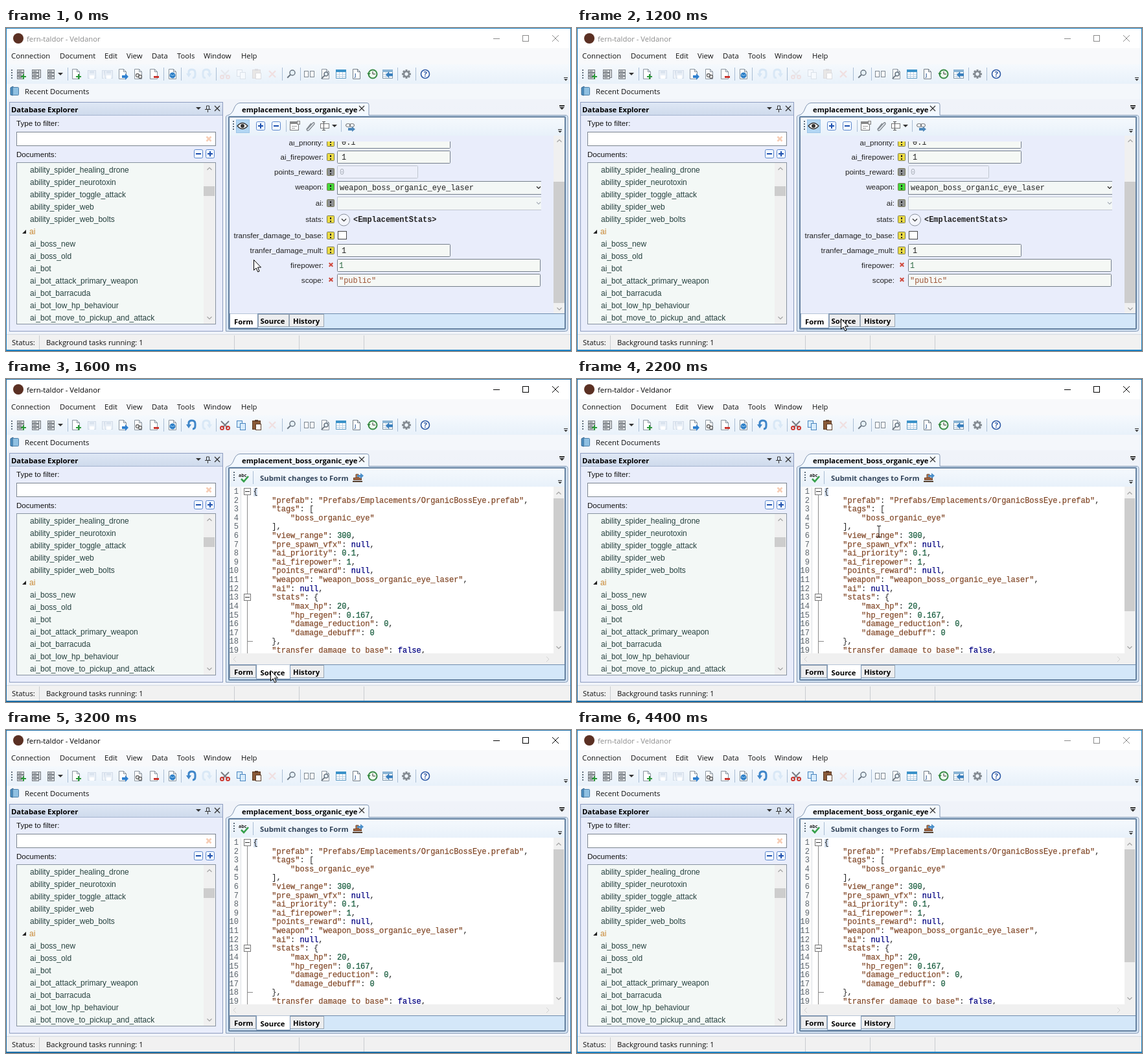
Recreate the animation shown at these times as an HTML page. Size 872 by 498 pixels, loop 4.6 s.

```html
<!DOCTYPE html>
<html lang="en">
<head>
<meta charset="utf-8">
<title>Document editor</title>
<style>
html, body { margin: 0; width: 872px; height: 498px; overflow: hidden; background: #fff; }
svg { display: block; }
text { white-space: pre; }
.ui { font: 11.3px "Open Sans", "Noto Sans", sans-serif; }
.bold { font: bold 11.3px "Open Sans", "Noto Sans", sans-serif; }
.list { font: 12px "Liberation Sans", Arial, sans-serif; }
.label { font: 11.6px "Liberation Sans", Arial, sans-serif; }
.value { font: 11.9px "Liberation Mono", monospace; }
.code { font: 12px "Liberation Mono", monospace; stroke-width: .25px; }
.mini { font: bold 7px "Open Sans", sans-serif; }
.strong { font-weight: bold; }
.hide { display: none; }
</style>
</head>
<body>
<svg id="stage" width="872" height="498" viewBox="0 0 872 498"></svg>
<script>
const R = (x, y, w, h, fill, line, r = 0) => line
  ? `<rect x="${x + .5}" y="${y + .5}" width="${w - 1}" height="${h - 1}" rx="${r}" fill="${fill}" stroke="${line}"/>`
  : `<rect x="${x}" y="${y}" width="${w}" height="${h}" rx="${r}" fill="${fill}"/>`;
const P = (d, line, fill = "none", w = 1) =>
  `<path d="${d}" stroke="${line}" fill="${fill}" stroke-width="${w}"/>`;
const C = (x, y, r, fill, line = "none", w = 1) =>
  `<circle cx="${x}" cy="${y}" r="${r}" fill="${fill}" stroke="${line}" stroke-width="${w}"/>`;
const T = (x, y, s, cls, fill = "#111", more = "") =>
  `<text x="${x}" y="${y}" class="${cls}" fill="${fill}" ${more}>${s}</text>`;
const G = (id, s) => `<g id="${id}">${s}</g>`;
const esc = s => s.replace(/</g, "&lt;").replace(/>/g, "&gt;");
const grad = (id, a, b) => `<linearGradient id="${id}" x2="0" y2="1">
  <stop stop-color="${a}"/><stop offset="1" stop-color="${b}"/></linearGradient>`;

const cross = (x, y, r, c, w) => P(`M${x - r} ${y - r}l${2 * r} ${2 * r}m0 ${-2 * r}l${-2 * r} ${2 * r}`, c, "none", w);
const chevron = (x, y, dir, c = "#a3a3a3", r = 3.5) =>
  P(`M${x - r} ${y - dir * r / 2}l${r} ${dir * r}l${r} ${-dir * r}`, c, "none", 1.2);
const drop = (x, y, r = 4, c = "#333") => P(`M${x - r} ${y - r / 2}h${2 * r}l${-r} ${r}z`, "none", c);
const sep = (x, y, h) => R(x, y, 1, h, "#a9bdd4");
const grip = (x, y) => [0, 4, 8, 12].map(d => R(x, y + d, 2, 2, "#5f6e7c")).join("");
const overflow = (x, y) => R(x - 3, y - 3, 6, 1, "#333") + drop(x, y + 1, 3);
const sign = (x, y, plus, s = 14) => R(x - s / 2, y - s / 2, s, s, "#f2f8ff", "#5b86cc", 2)
  + R(x - 4, y - 1, 8, 2, "#1c4fae") + (plus ? R(x - 1, y - 4, 2, 8, "#1c4fae") : "");

// Toolbar icons, drawn around (x, y)
const Y = 71;
const page = (x, line = "#8a949e", fill = "#fff", y = Y) =>
  P(`M${x - 5.5} ${y - 7.5}h7l4 4v11h-11z M${x + 1.5} ${y - 7.5}v4h4`, line, fill);
const server = x => [-7, -2, 3].map(d => R(x - 6, Y + d, 11, 5, "#d9dcdf", "#757b81") + R(x - 4, Y + d + 2, 5, 1, "#62686e")).join("");
const disk = x => R(x - 6, Y - 6, 13, 13, "#e9eff7", "#d3dde9") + R(x - 3, Y - 6, 7, 5, "#dbe4ef") + R(x - 3, Y + 2, 7, 5, "#fff");
const plus = (x, c) => R(x, Y + 3, 8, 2, c) + R(x + 3, Y, 2, 8, c);
const table = (x, head, line) => R(x - 8, Y - 7, 16, 14, "#fff", line) + R(x - 8, Y - 7, 16, 4, head)
  + P(`M${x - 7} ${Y + .5}h14m-14 3h14M${x - 2.5} ${Y - 3}v9m5 0v-9`, "#bcd1e5");
const lens = (x, y, r = 4) => C(x, y, r, "#e7f2fb", "#6c7782", 1.5) + P(`M${x - r * .7} ${y + r * .7}l-5 5`, "#6c7782", "none", 2);
const turn = (x, f, c) => P(`M${x - 4 * f} ${Y - 1}v-2q0 -4 ${5 * f} -4q${5 * f} 0 ${5 * f} 5v3q0 5 ${-4 * f} 5`, c, "none", 3)
  + P(`M${x - 8 * f} ${Y - 1}h${8 * f}l${-4 * f} 6z`, "none", c);
const copy = (x, line, fill) => R(x - 7, Y - 7, 9, 11, fill, line) + R(x - 2, Y - 3, 9, 11, fill, line);
const paste = (x, board, line) => R(x - 7, Y - 7, 13, 14, board, line) + R(x - 3, Y - 8, 5, 3, line) + R(x - 2, Y - 2, 9, 10, "#fff", line);
const cut = (x, c, h) => P(`M${x - 6} ${Y - 6}l10 10m2 -10l-10 10`, c, "none", 2)
  + C(x - 4.5, Y + 4.5, 2.5, "none", h, 2) + C(x + 4.5, Y + 4.5, 2.5, "none", h, 2);
const edits = on => turn(286, 1, on ? "#3f86c9" : "#d6e6f5")
  + cut(338, on ? "#7b7f86" : "#e6e8ed", on ? "#cc3a32" : "#eddfe1")
  + copy(363, on ? "#4a86c0" : "#dbe2ea", on ? "#d8ecfc" : "#f6f9fd")
  + paste(387, on ? "#8a5a38" : "#e9e7e6", on ? "#5c3c28" : "#dcdce0");

const gear = [...Array(8)].map((_, i) =>
  `<rect x="616.5" y="64" width="3" height="4" fill="#848b92" transform="rotate(${i * 45} 618 71)"/>`).join("")
  + C(618, 71, 4, "none", "#848b92", 2.6);

const mainBar = grip(8, 64)
  + server(23) + plus(23, "#2b9a3a") + R(45, 64, 9, 13, "#d9dcdf", "#757b81") + server(46)
  + server(70) + drop(84, 71)
  + page(108) + plus(108, "#2b9a3a") + disk(132) + disk(154) + disk(158)
  + page(180) + P("M179 73h5v-3l5 5-5 5v-3h-5z", "none", "#2f80cf")
  + page(204) + C(203, 73, 2.5, "none", "#666", 1.3) + C(207, 75, 2.5, "none", "#666", 1.3)
  + page(228) + R(228, 74, 8, 3, "#c9322c")
  + page(257) + C(257, 73, 4.5, "#2f7fc6") + P("M254 72q3 3 6 0", "#9fd3f5")
  + turn(310, -1, "#d9e8f6") + cross(411, Y, 5, "#f0dfe1", 2.4)
  + lens(442, 69) + R(460, 66, 7, 10, "#fff", "#7d8790") + R(469, 66, 7, 10, "#fff", "#7d8790")
  + page(493) + lens(494, 71, 3)
  + table(517, "#3b92c9", "#5f9bc3") + page(541, "#737d86") + T(538, 75, "J", "mini", "#2b5c99")
  + C(566, 71, 6.5, "#eef8ee", "#3a8c46", 2) + P("M566 67v4h4", "#333") + drop(560, 71, 3, "#2d8138")
  + table(589, "#8ab4d4", "#8298a9") + P("M597 70h-6v-3l-5 5 5 5v-3h6z", "none", "#397fbd")
  + gear
  + C(647, 71, 6.5, "#fff", "#2d59a5", 1.6) + T(644.5, 75, "?", "bold", "#2d59a5")
  + [95, 243, 270, 324, 426, 454, 604, 632].map(x => sep(x, 61, 20)).join("")
  + overflow(864, 79);

const caption = c => T(32, 21, "fern-taldor - Veldanor", "ui", c)
  + R(752, 16, 10, 1, c) + R(797, 11, 10, 10, "none", c) + cross(848, 16, 5, c, 1);

const menus = [[8, "Connection"], [83, "Document"], [152, "Edit"], [186, "View"], [225, "Data"], [264, "Tools"], [305, "Window"], [363, "Help"]];
const frame = R(0, 0, 872, 498, "#f0f3f9") + R(0, 0, 872, 31, "#fff") + R(0, 31, 872, 25, "#f8f9fb")
  + R(0, 56, 872, 30, "url(#bar)") + R(0, 86, 872, 24, "#f4f7fb")
  + C(19, 16, 8, "#5b3023")
  + menus.map(([x, s]) => T(x, 47, s, "ui")).join("") + mainBar
  + P("M7 92l4-2v14l-4-1z", "#33648f", "#4d8fc0") + R(10, 91, 10, 13, "#8fc0e2", "#4b7fa9", 1)
  + T(29, 102, "Recent Documents", "ui");

const names = ["ability_spider_healing_drone", "ability_spider_neurotoxin", "ability_spider_toggle_attack",
  "ability_spider_web", "ability_spider_web_bolts", "ai", "ai_boss_new", "ai_boss_old", "ai_bot",
  "ai_bot_attack_primary_weapon", "ai_bot_barracuda", "ai_bot_low_hp_behaviour", "ai_bot_move_to_pickup_and_attack"];
const explorer = R(5, 114, 330, 354, "#e9edfb", "#8d9cc0") + R(6, 115, 328, 19, "url(#head)") + R(6, 134, 328, 1, "#a5b4cf")
  + T(8, 130, "Database Explorer", "bold", "#000") + drop(297, 124)
  + P("M309.5 120v5.5h4v-5.5zM307 125.5h9M311.5 126v4", "#333") + cross(326, 124, 4, "#333", 1.3)
  + T(16, 151, "Type to filter:", "label")
  + R(16, 160, 308, 22, "#fff", "#7b848f") + cross(313, 171, 3.5, "#f6cdb5", 2.6)
  + T(16, 199, "Documents:", "label") + sign(297, 194, 0) + sign(315, 194, 1)
  + R(16, 207, 308, 250, "#f3f8f6", "#8792a0") + R(305, 208, 18, 248, "#f0f0f0") + R(305, 244, 17, 15, "#cdcdcd")
  + chevron(314, 217, -1) + chevron(314, 447, 1)
  + names.map((s, i) => T(s === "ai" ? 36 : 37, 223 + 19 * i, s, "list", s === "ai" ? "#c8852f" : "#26413f")).join("")
  + P("M25 317h6v-6z", "none", "#222");

const editor = R(339, 114, 528, 354, "url(#dock)")
  + P("M339.5 467.5V137q0-2 3-2.5Q349 133 352 124Q355 116 361 115.5H557q3 0 3 3V134.5H864q3 0 3 3V464q0 3.5-3.5 3.5z", "#8196b2", "url(#tab)")
  + R(341, 135, 525, 331, "#d5e5f5") + R(343, 136, 521, 329, "#64809f", "", 2) + R(345, 138, 517, 325, "#e9edfb")
  + R(345, 138, 517, 28, "url(#bar)") + T(364, 130, "emplacement_boss_organic_eye", "bold", "#000")
  + cross(549, 124, 4, "#333", 1.2) + R(854, 119, 8, 2, "#333") + drop(858, 124) + overflow(855, 159)
  + R(345, 440, 517, 23, "#d4e7f9") + R(345, 440, 517, 1, "#6f8cae");

const tab = (x, w, on) => R(x, on ? 440 : 441, w, on ? 23 : 20, on ? "#fff" : "#ecedef", on ? "none" : "#9aa7b5")
  + (on ? P(`M${x + .5} 440v22.5h${w - 1}v-22.5`, "#7d98b8") : "");
const tabText = active => ["Form", "Source", "History"].map((s, i) =>
  T([352, 392.5, 443][i], s === active ? 457 : 456, s, "bold", "#000")).join("");

const badge = (y, c) => R(495, y - 5, 12, 12, c, "#7a7a55", 1) + R(500, y - 2, 2, 3, "#222") + R(500, y + 3, 2, 2, "#222");
const input = (y, w, s, x = 518, c = "#222") => R(511, y - 10, w, 20, "#f5f8f5", "#757f8b", 1) + T(x, y + 4, s, "value", c);
const combo = (y, s, c, line) => P(`M826 ${y - 9.5}H511.5v20H826`, line, "#f3f7f6") + T(515, y + 4, s, "value", c) + chevron(822, y, 1, c, 3);
const off = "#aab0ba", yellow = "#ecdc45", grey = "#8f9194";
const rows = [
  [177, "ai_priority", yellow, input(176, 175, "0.1")],
  [199, "ai_firepower", yellow, input(199, 175, "1")],
  [222, "points_reward", grey, R(511, 212, 125, 20, "#eceffa", "#c0c6d0", 1) + T(515, 226, "0", "value", off)],
  [245, "weapon", "#45d83a", combo(246, "weapon_boss_organic_eye_laser", "#222", "#757f8b")],
  [270, "ai", grey, combo(270, "", off, "#c0c6d0")],
  [295, "stats", yellow, C(521.5, 296, 9, "#f3f5fc", "#8b929d") + chevron(521.5, 296, 1, "#333")
    + T(536, 299, esc("<EmplacementStats>"), "value strong", "#222")],
  [320, "transfer_damage_to_base", yellow, R(512, 313, 14, 13, "#fff", "#444")],
  [343, "tranfer_damage_mult", yellow, input(343, 175, "1")],
  [366, "firepower", "", input(366, 314, "1", 514, "#2f6a45")],
  [389, "scope", "", input(389, 314, '"public"', 514, "#9b5132")]
];
const formView = grip(350, 143) + R(355, 141, 21, 21, "#b2d6f3", "#9cc5e8")
  + P("M357 151q8-9 16 0q-8 9-16 0z", "#333", "#fff", 1.3) + C(365, 151, 3, "#333")
  + sign(393, 151, 1) + sign(417, 151, 0) + sep(432, 142, 18)
  + R(438, 144, 14, 14, "#fff", "#777") + R(438, 144, 14, 4, "#888") + P("M441 151.5h8m-8 3h5", "#999") + R(449, 143, 5, 6, "#ddd", "#888")
  + P("M465 156l8-9q3-3 3 1l-8 9q-3 3-4-1l7-9", "#858b92", "none", 1.4)
  + R(485, 147, 14, 8, "#fff", "#777") + P("M488 144.5h5m-2.5 0v13m-2.5 0h5", "#555") + drop(507, 151) + sep(517, 142, 18)
  + R(524, 147, 8, 6, "none", "#666", 3) + R(530, 147, 8, 6, "none", "#666", 3) + P("M528 154h6v-2l5 4-5 4v-2h-6z", "none", "#4d87b9")
  + R(345, 166, 500, 274, "#e9edfb")
  + `<g clip-path="url(#body)">${rows.map(([y, s, c, box]) =>
      T(490, y + 4, s + ":", "label", "#222", 'text-anchor="end"')
      + (c ? badge(y - 1, c) : cross(501.5, y - 1, 2.8, "#d0483c", 2)) + box).join("")}</g>`
  + R(845, 166, 17, 274, "#f0f0f0") + R(845, 237, 17, 187, "#cdcdcd") + chevron(854, 174, -1) + chevron(854, 433, 1)
  + tab(389, 48) + tab(437, 54) + tab(345, 44, true) + tabText("Form");

const lines = `{
    "prefab": "Prefabs/Emplacements/OrganicBossEye.prefab",
    "tags": [
        "boss_organic_eye"
    ],
    "view_range": 300,
    "pre_spawn_vfx": null,
    "ai_priority": 0.1,
    "ai_firepower": 1,
    "points_reward": null,
    "weapon": "weapon_boss_organic_eye_laser",
    "ai": null,
    "stats": {
        "max_hp": 20,
        "hp_regen": 0.167,
        "damage_reduction": 0,
        "damage_debuff": 0
    },
    "transfer_damage_to_base": false,`.split("\n");
const paint = s => s.replace(/"[^"]*"|\b[\d.]+\b|null|false/g, w => {
  const c = w[0] === '"' ? "#834a2a" : /\d/.test(w) ? "#175c3d" : "#000080";
  return `<tspan fill="${c}" stroke="${c}">${w}</tspan>`;
});
const fold = y => R(367, y - 5, 11, 11, "#fff", "#777") + R(369, y, 7, 1, "#333");
const codeRow = (s, i) => {
  const y = 177 + 13.61 * i, pad = s.length - s.trimStart().length;
  return T(359, y, i + 1, "code", "#5d666e", 'text-anchor="end"') + T(381.5 + pad * 7.2, y, paint(s.trim()), "code", "#222");
};
const sourceView = R(345, 166, 500, 257, "#fff") + grip(351, 143)
  + G("hot", R(355, 141, 25, 24, "#d3e8f9"))
  + T(359, 151, "abc", "mini", "#222") + P("M363 154l4 4 7-8", "#35a04a", "none", 2.6) + sep(381, 142, 20)
  + T(392, 157, "Submit changes to Form", "bold", "#34465c")
  + R(536, 152, 13, 4, "#a86b45", "#6d4028") + P("M540 152v-5h4v5", "#6d4028", "#bd8055") + R(535, 157, 15, 2, "#55402f")
  + P("M542 148h5v-3l5 4-5 5v-3h-5z", "none", "#4a8fca")
  + R(345, 166, 17, 257, "#fafafa") + R(362, 167, 1, 256, "#dfe2e6") + R(372, 178, 1, 245, "#8a8a8a") + R(372, 404, 9, 1, "#8a8a8a")
  + R(382, 168, 6, 13, "#d3e0f1") + fold(173) + fold(336)
  + `<g clip-path="url(#page)">${lines.map(codeRow).join("")}</g>`
  + R(345, 423, 517, 17, "#f0f0f0") + R(845, 166, 17, 257, "#f0f0f0") + R(845, 184, 16, 174, "#cdcdcd")
  + chevron(853, 176, -1) + chevron(853, 414, 1)
  + P("M355 428l-4 4 4 4M834 428l4 4-4 4", "#d2d2d2")
  + tab(345, 41) + tab(438, 53) + tab(386, 53, true) + tabText("Source");

const status = R(0, 472, 872, 25, "#f1f1f1") + R(0, 472, 872, 1, "#d6dbe2")
  + [51, 352, 452, 552].map(x => R(x, 474, 1, 22, "#c9ccd0")).join("")
  + T(9, 489, "Status:", "ui") + T(62, 489, "Background tasks running: 1", "ui");

stage.innerHTML = `<defs>${grad("bar", "#f5f9fd", "#e8f1fa")}${grad("head", "#dfe8f5", "#cedaec")}
  ${grad("tab", "#f4f9ff", "#dbe8f6")}${grad("dock", "#f0f3f9", "#eaf1fa")}
  <clipPath id="body"><rect x="345" y="175" width="481" height="264"/></clipPath>
  <clipPath id="page"><rect x="345" y="166" width="500" height="257"/></clipPath></defs>`
  + frame + G("idle", caption("#8b8b8b")) + G("live", caption("#000"))
  + G("editOff", edits(false)) + G("editOn", edits(true))
  + explorer + editor + G("form", formView) + G("source", sourceView) + status
  + `<path id="edge" d="M0 0H872V498H0zM1 1V496H871V1z" fill-rule="evenodd"/>`
  + G("arrow", P("M.5 .5v16l3.6-3.5 2.6 6 2.4-1-2.6-6h5z", "#000", "#fff"))
  + G("beam", P("M-3 -8.5h2.5l.5 1 .5-1H3M0 -8V8M-3 8.5h2.5l.5-1 .5 1H3", "#222"));

// time, x, y, pointer
const path = [
  [0, 382, 357, "arrow"], [600, 383, 357, "arrow"], [800, 390, 376, "arrow"], [1000, 403, 436, "arrow"],
  [1200, 407, 448, "arrow"], [1400, 408, 449, "arrow"], [1800, 410, 447, "arrow"], [2000, 420, 435, "arrow"],
  [2200, 466, 235, "beam"], [2400, 401, 167, "arrow"], [2600, 375, 152, "arrow"], [2800, 372, 146, "arrow"],
  [3000, 371, 128, "arrow"], [3200, 0, 0, ""]
];
const el = id => document.getElementById(id);
const show = (id, on) => el(id).classList.toggle("hide", !on);

function draw(now) {
  const t = now % 4600;
  const [, x, y, kind] = path.findLast(p => p[0] <= t);
  const active = t >= 1400 && t < 4400, src = t >= 1600;
  for (const id of ["arrow", "beam"]) {
    show(id, kind === id);
    el(id).setAttribute("transform", `translate(${x} ${y})`);
  }
  show("live", active);
  show("idle", !active);
  show("form", !src);
  show("source", src);
  show("editOn", src);
  show("editOff", !src);
  show("hot", t >= 2600 && t < 3000);
  el("edge").setAttribute("fill", active ? "#1a6da8" : "#1b81c4");
}
const start = performance.now();
function tick() {
  draw(performance.now() - start);
  requestAnimationFrame(tick);
}
tick();
</script>
</body>
</html>
```
